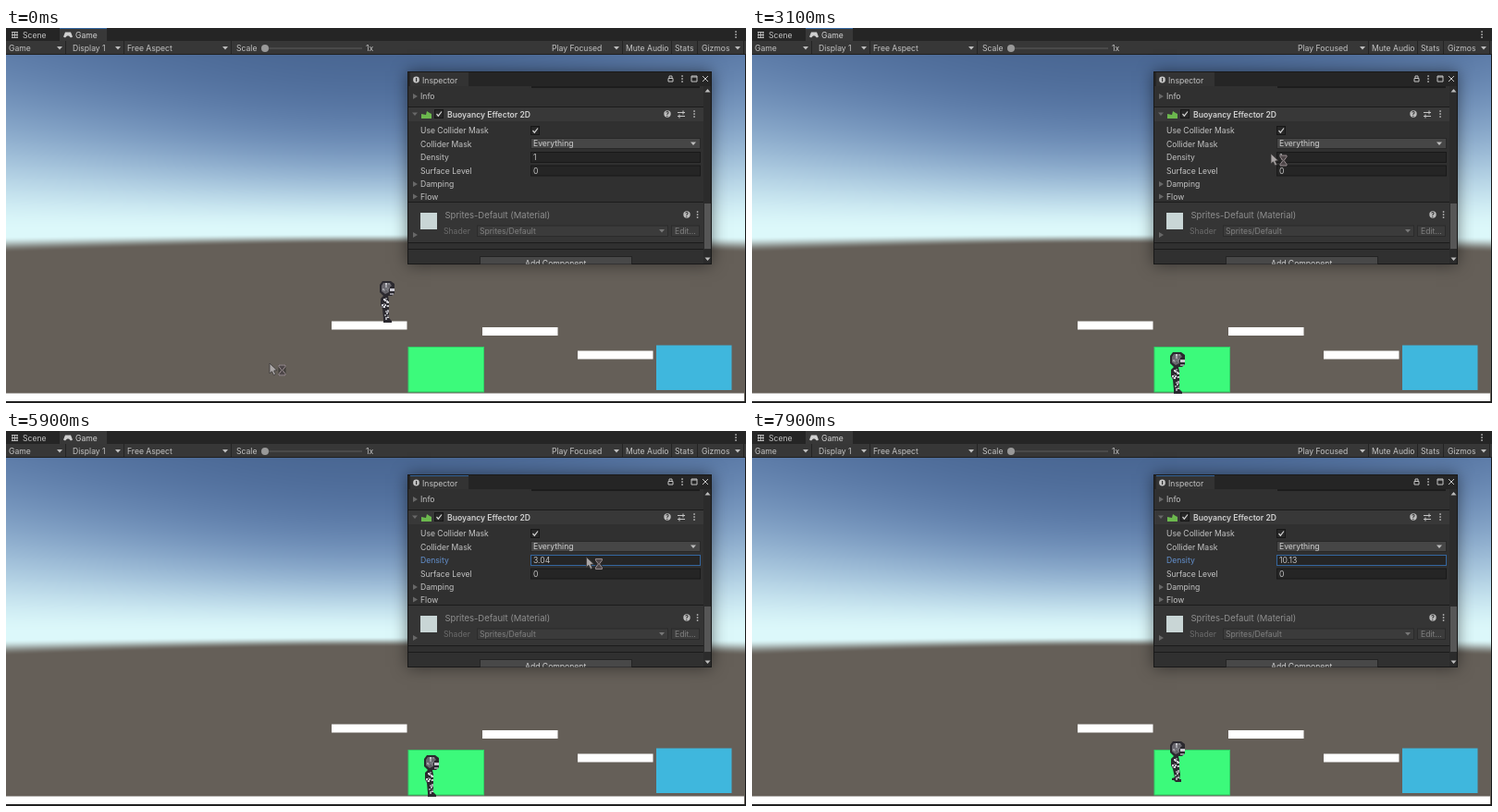
An HTML page with a canvas that plays this animation: 800 by 406 pixels, repeating every 8000 ms.

```html
<!DOCTYPE html>
<html>
<head>
<meta charset="utf-8">
<style>
html, body { margin: 0; height: 100%; overflow: hidden; background: #191919; }
canvas { display: block; }
</style>
</head>
<body>
<canvas id="stage" width="800" height="406"></canvas>
<script>
const W = 800, H = 406, LOOP = 8000, STEP = 100;
const INK = '#c4c4c4', LINE = '#1b1b1b', BLUE = '#34669f';
const stage = document.getElementById('stage').getContext('2d');
let g = stage;

// 0 before a, 1 after b, straight or eased between
const ramp = (t, a, b) => Math.max(0, Math.min(1, (t - a) / (b - a)));
const ease = (t, a, b) => { const u = ramp(t, a, b); return u * u * (3 - 2 * u); };
const mix = (a, b, u) => a + (b - a) * u;

function seeded(seed) {
  return () => (seed = (seed * 16807) % 2147483647) / 2147483647;
}

// drawing helpers
function rect(x, y, w, h, c) { g.fillStyle = c; g.fillRect(x, y, w, h); }
function text(s, x, cy, c = INK, size = 8.6, weight = 400) {
  g.font = `${weight} ${size}px Inter, "Liberation Sans", sans-serif`;
  g.fillStyle = c;
  g.fillText(s, x, cy + size * 0.36);
}
function shape(d, x, y, fill, line, width = 1) {
  const p = new Path2D(d);
  g.save();
  g.translate(x, y);
  if (fill) { g.fillStyle = fill; g.fill(p); }
  if (line) { g.strokeStyle = line; g.lineWidth = width; g.stroke(p); }
  g.restore();
}
function oval(x, y, rx, ry, c) {
  g.beginPath();
  g.ellipse(x, y, rx, ry, 0, 0, 7);
  g.fillStyle = c;
  g.fill();
}
function box(x, y, w, h, c, line) {
  rect(x, y, w, h, line);
  rect(x + 1, y + 1, w - 2, h - 2, c);
}
const down = (x, y, c = '#bdbdbd') => shape('M-3-1.5H3L0 2Z', x, y, c);
const fold = y => shape('M-2-3L3 0L-2 3Z', 442, y, '#686868');
const dots = (x, y) => { for (let d = -3; d <= 3; d += 3) rect(x - 0.7, y + d - 0.7, 1.5, 1.5, INK); };
function help(x, y) {
  oval(x, y, 3.7, 3.7, '#bcbcbc');
  text('?', x - 2, y, '#2f2f2f', 7, 700);
}
function check(x, y) {
  box(x - 5, y - 5, 10, 10, '#272727', '#171717');
  shape('M-2.5 0L-.7 2.2L3-2.5', x, y, null, '#d2d2d2', 1.2);
}
function field(y, active) {
  box(567, y - 6, 184, 12, '#252525', active ? BLUE : '#191919');
}

// sky fades from a bright horizon to blue, by sine of elevation through a 60 degree lens
const ZENITH = [66, 94, 132], HORIZON = [220, 248, 250], GROUND = [101, 95, 88], FADE = [0.24, 0.25, 0.31];
function drawSky() {
  const img = g.createImageData(W, 377), lens = 326;
  for (let y = 0, p = 0; y < 377; y++) {
    for (let x = 0; x < W; x++, p += 4) {
      const dy = 188 - y, s = dy / Math.hypot(lens, x - 400, dy), above = ease(s, -0.05, -0.016);
      for (let i = 0; i < 3; i++) {
        const sky = mix(ZENITH[i], HORIZON[i], Math.exp(-((Math.max(s, 0) / FADE[i]) ** 1.5)));
        img.data[p + i] = mix(GROUND[i], sky, above);
      }
      img.data[p + 3] = 255;
    }
  }
  g.putImageData(img, 0, 29);
}

function drawScene() {
  drawSky();
  rect(0, 395.5, 798, 8.5, '#fff');
  rect(0, 404, W, 2, '#202020');
  rect(799, 29, 1, 377, '#191919');
  for (const [x, y] of [[352, 317.5], [515, 324], [618, 349.5]]) rect(x, y, 81.5, 9, '#fff');
  box(434.5, 345, 82.5, 49.5, '#3cfa7b', '#32cf66');
  rect(703, 343.5, 81.5, 48.5, '#3fb7dd');
}

function drawToolbar() {
  rect(0, 0, W, 14, '#252525');
  rect(58, 0, 51, 14, '#383838');
  rect(0, 14, W, 15, '#373737');
  rect(0, 28, W, 1, '#1f1f1f');
  shape('M6 4.5h7M6 7.5h7M6 10.5h7M7 4v7M9.5 4v7M12 4v7', 0, 0, null, INK, 0.9);
  text('Scene', 18, 7.5);
  shape('M64 4.5h6l2 5l-2 1l-2-2h-2l-2 2l-2-1Z', 0, 0, '#d0d0d0');
  text('Game', 75, 7.5, '#d4d4d4');
  dots(789, 7);
  // label, left edge, right edge of its menu
  for (const [s, x, end] of [['Game', 3, 64], ['Display 1', 72, 127], ['Free Aspect', 131, 243], ['Scale', 249],
    ['1x', 389], ['Play Focused', 590, 666], ['Mute Audio', 670], ['Stats', 723], ['Gizmos', 752, 797]]) {
    text(s, x, 21.5);
    if (end) {
      down(end - 6, 21.5);
      rect(end, 14, 1, 14, '#242424');
    }
  }
  rect(719, 14, 1, 14, '#242424');
  rect(747, 14, 1, 14, '#242424');
  rect(280, 21.5, 105, 1, '#5e5e5e');
  oval(280, 22, 4, 4, '#999');
}

function drawWindow() {
  g.shadowColor = 'rgba(0,0,0,.5)';
  g.shadowBlur = 16;
  rect(434, 47, 329, 209, '#191919');
  g.shadowBlur = 0;
  rect(435, 48, 327, 15, '#252525');
  rect(437, 48, 63, 15, '#333');
  rect(435, 63, 327, 192, '#303030');
  oval(443.5, 56, 3.4, 3.4, INK);
  rect(443, 54, 1.2, 4, '#333');
  text('Inspector', 450, 56.5);
  shape('M-2.5 0h5v3.5h-5ZM-1.5 0v-2.5h3v2.5', 718.5, 54.5, null, INK);
  dots(731, 55);
  shape('M741 52h6v6h-6ZM741 53h6M753 52l6 6M759 52l-6 6', 0, 0, null, INK);
  rect(754, 63, 8, 192, '#2b2b2b');
  rect(755, 190, 7, 49, '#565656');
  shape('M-3 1.5H3L0-2Z', 758.5, 68, '#bdbdbd');
  down(758.5, 250);
}

function drawInspector() {
  const row = i => 111 + 14.5 * i;
  rect(568, 63, 182, 2, '#1d1d1d');
  rect(435, 85, 319, 16, '#383838');
  rect(435, 189, 319, 43, '#353535');
  for (const y of [85, 188, 232, 239]) rect(435, y, 319, 1, LINE);

  fold(74);
  text('Info', 448, 74);
  down(442, 93, '#686868');
  shape('M449 93l5 1l1-4l3 2l2 1v5h-11Z', 0, 0, '#6cb84e');
  check(468, 93);
  text('Buoyancy Effector 2D', 477, 93.5, '#d2d2d2', 8.6, 600);
  help(715, 93);
  shape('M726 91.5h8M726 95.5h8M732 89.5v4M728 93.5v4', 0, 0, null, INK);
  dots(744, 93);

  ['Use Collider Mask', 'Collider Mask', 'Density', 'Surface Level', 'Damping', 'Flow']
    .forEach((s, i) => text(s, 448, row(i) - (i === 5)));
  check(572, row(0));
  box(567, row(1) - 6.5, 184, 12, '#464646', '#282828');
  text('Everything', 570, row(1) - 0.5, '#d0d0d0');
  down(743, row(1) - 0.5);
  field(row(3));
  text('0', 570, row(3));
  fold(row(4));
  fold(row(5) - 1);

  rect(448, 200, 18, 18, '#c9d6d6');
  text('Sprites-Default (Material)', 474.5, 203, '#8f8f8f', 9.5);
  help(736, 202);
  dots(747.5, 202);
  fold(224);
  text('Shader', 473, 220, '#6c6c6c');
  box(509, 213.5, 207, 12.5, '#3b3b3b', '#2b2b2b');
  text('Sprites/Default', 512, 219.5, '#808080');
  down(709, 219.5, '#777');
  box(719, 213.5, 31, 12.5, '#3b3b3b', '#2b2b2b');
  text('Edit...', 723, 219.5, '#808080');

  g.save();
  g.beginPath();
  g.rect(435, 240, 319, 15.5);
  g.clip();
  box(512, 247, 165, 18, '#484848', '#242424');
  text('Add Component', 561, 255, '#d0d0d0');
  g.restore();
}

function drawFocus(panel) {
  if (panel) rect(437, 48, 63, 1, BLUE);
  else rect(58, 0, 51, 1, BLUE);
}

function drawDensity(value, active) {
  if (active) {
    rect(447, 134, 60, 12, '#303030');
    text('Density', 448, 140, '#6391cf');
  }
  field(140, active);
  text(value === 1 ? '1' : value.toFixed(2), 570, 140);
}

// x is the middle of the head, y its top; plates are scattered over a dark figure
function drawRobot(x, y, hanging) {
  const dark = '#2b292f', rnd = seeded(11);
  const plates = (x, y, w, h, n) => {
    while (n--) {
      const tone = 95 + 125 * rnd();
      rect(x + Math.floor(rnd() * w), y + Math.floor(rnd() * h), 2, 2, `rgb(${tone},${tone},${tone + 6})`);
    }
  };
  g.save();
  g.translate(Math.round(x), Math.round(y));
  shape('M-5 0H4L8 3V13L5 16H-4L-8 12V4Z', 0, 0, dark);
  shape('M-4 2H3L5 5L2 7V12L-2 14L-6 11V5Z', 0, 0, '#69676e');
  plates(-5, 2, 8, 10, 12);
  rect(3, 8, 5, 3, '#c9c8d0');
  rect(3, 13, 4, 2, '#8f8d95');
  shape('M-4 16H1L2 21V30H-5L-7 26V19Z', 0, 0, dark);
  plates(-6, 18, 7, 11, 14);
  shape(hanging ? 'M-5 30H2L3 36L2 41H4V44H-2L-4 42H-6V40L-3 39Z' : 'M-5 30H2V40L5 43V45H-4V41Z', 0, 0, dark);
  plates(-3, 31, 4, 10, 9);
  g.restore();
}

function drawCursor(x, y, mode) {
  const busy = mode === 'busy';
  shape('M0 0V11L2.5 8.8L4.5 13L6.5 12L4.6 8L8 7.6Z', x, y, busy ? '#aaa6a6' : '#fff', '#3a3838', 0.8);
  if (busy) {
    rect(x + 9.5, y + 1.5, 8, 12, 'rgba(42,40,40,.6)');
    shape('M10 2h7v1.5l-3 4l3 4v1.5h-7v-1.5l3-4l-3-4Z', x, y, '#4d4648', '#a3979a', 0.9);
  } else if (mode === 'slide') {
    shape('M-5 3l3-2.5v5ZM8.5 3l-3-2.5v5Z', x, y, '#eee');
  }
}

// pointer moves: start, end, dx, dy
const MOVES = [[1370, 2000, 279, -245], [2000, 2400, 10, 60], [2600, 2700, -13, -42], [4500, 5100, 15, 0]];
function pointer(t, drag) {
  let x = 285 + 230 * drag, y = 363 + 2 * drag;
  for (const [a, b, dx, dy] of MOVES) {
    const u = ease(t, a, b);
    x += dx * u;
    y += dy * u;
  }
  return [x, y];
}

// still parts are painted once
const still = document.createElement('canvas');
still.width = W;
still.height = H;
g = still.getContext('2d');
drawScene();
drawToolbar();
drawWindow();
drawInspector();
g = stage;

function frame(now) {
  const t = Math.floor(now % LOOP / STEP) * STEP;
  const active = t >= 4300, drag = ramp(t, 5324, 7900), rise = ramp(t, 6300, 7900);
  const robotX = 412 + 10 * ramp(t, 100, 500) + 38 * ramp(t, 600, 1200);
  const robotY = 274 + 77 * ramp(t, 950, 1500) ** 2 - 15 * rise;
  const mode = t < 3900 || drag ? 'busy' : active ? 'slide' : 'plain';
  g.drawImage(still, 0, 0);
  drawFocus(active);
  drawDensity(1 + 9.13 * drag, active);
  drawRobot(robotX, robotY, rise > 0 || t >= 900 && t < 1500);
  drawCursor(...pointer(t, drag), mode);
  requestAnimationFrame(frame);
}
requestAnimationFrame(frame);
</script>
</body>
</html>
```
